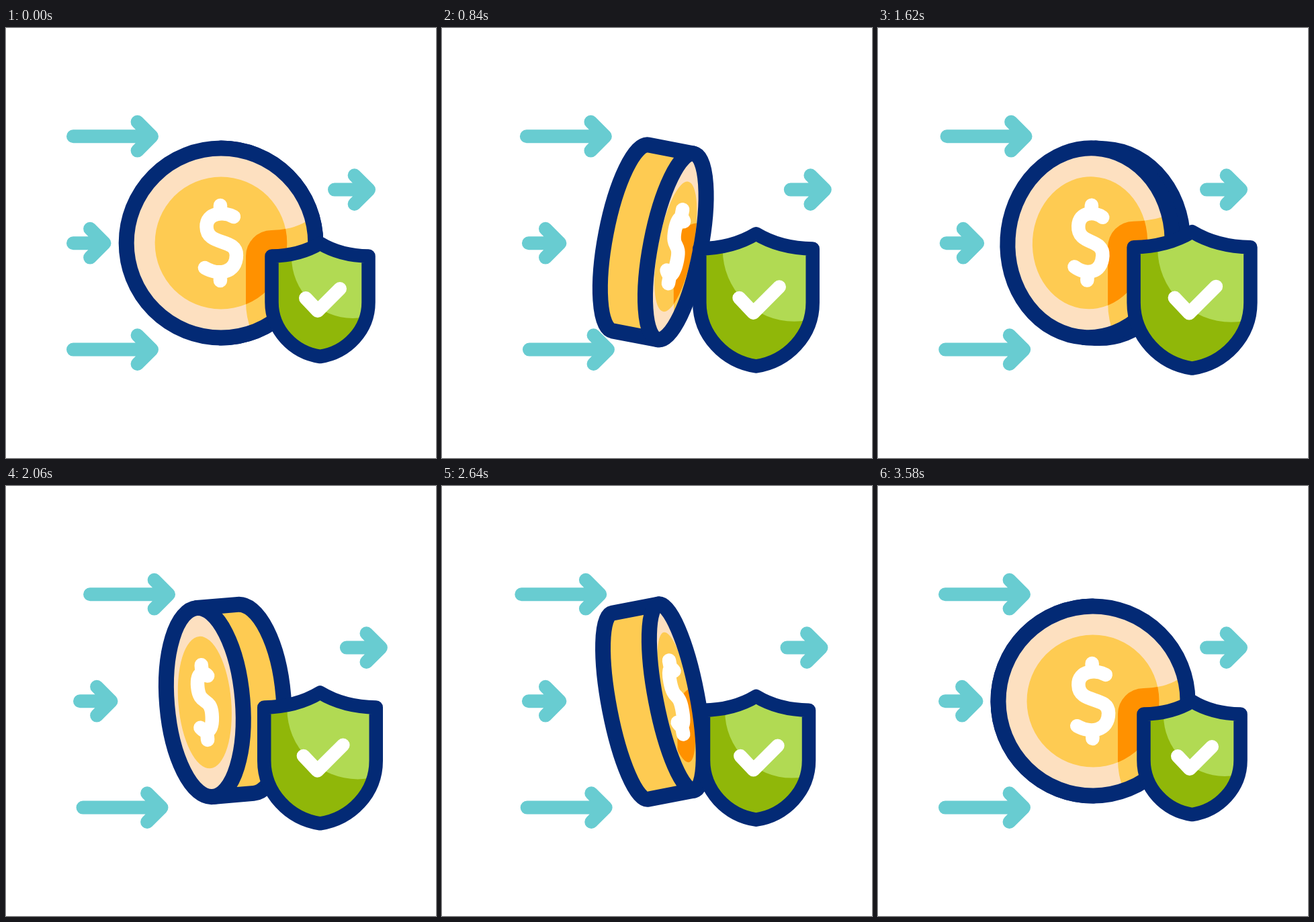
These frames come from a looping animation (640x640 px, 3600 ms). An HTML page with a canvas:

```html
<!DOCTYPE html>
<html lang="en">
<head>
<meta charset="utf-8">
<title>Protected payment</title>
<style>
  html, body { margin: 0; width: 100%; height: 100%; overflow: hidden; background: #fff; }
  canvas { display: block; width: 640px; height: 640px; }
</style>
</head>
<body>
<canvas id="stage" width="640" height="640"></canvas>
<script>
const ctx = document.getElementById('stage').getContext('2d');
const LOOP = 3600;
const NAVY = '#032a75', GOLD = '#fecb52', PEACH = '#fde0c0', ORANGE = '#ff9100';
const TEAL = '#68ccd1', GREEN = '#90b709', LIME = '#b1da53', WHITE = '#fff';
const R = 141, RIM = 23;

// Tail x, line length, y, then times of: start, out, back, out, back
const ARROWS = [
  { x: 100, y: 161.2, len: 117, keys: [0, 640, 1469, 2276, 3240] },
  { x: 489, y: 240.6, len: 51, keys: [0, 800, 1608, 2415, 3380] },
  { x: 100, y: 478.6, len: 117, keys: [50, 860, 1664, 2475, 3440] },
  { x: 100, y: 320.2, len: 46.5, keys: [130, 940, 1743, 2554, 3519] }
];
const COIN_KEYS = [0, 630, 1490, 2405, 3570];

// Shapes are relative to the centre of their group
const SHIELD = new Path2D('M-72-64.5Q-30.5-65 0-83.5Q30.5-65 72-64.5V4C72 46 39.5 79 0 85C-39.5 79-72 46-72 4Z');
const GLOSS = new Path2D();
GLOSS.arc(48.5, -63, 91, 0, 2 * Math.PI);
const CHECK = new Path2D('M-21.5-2L-3.5 17L29.5-16');
const DOLLAR = new Path2D('M19-39C5-47-22-46-21.5-24C-21 5 23-8 23 18C23 46-5 48-24 37M-1-56V-44M-1 44V56');

ctx.lineCap = ctx.lineJoin = 'round';

const wave = u => (1 - Math.cos(Math.PI * u)) / 2;

function stroke(path, color, width) {
  ctx.strokeStyle = color;
  ctx.lineWidth = width;
  ctx.stroke(path);
}

function fill(path, color) {
  ctx.fillStyle = color;
  ctx.fill(path);
}

function clipTo(path, draw) {
  ctx.save();
  ctx.clip(path);
  draw();
  ctx.restore();
}

// Transforming the path, not the context, keeps line widths constant
function place(path, matrix) {
  const out = new Path2D();
  out.addPath(path, matrix);
  return out;
}

// Segment index and progress within a list of key times
function segment(keys, t) {
  if (t <= keys[0]) return [0, 0];
  for (let i = 1; i < keys.length; i++) {
    if (t < keys[i]) return [i - 1, (t - keys[i - 1]) / (keys[i] - keys[i - 1])];
  }
  return [keys.length - 2, 1];
}

function drawArrow({ x, y, len, keys }, t) {
  const [i, u] = segment(keys, t);
  const out = i % 2 ? 1 - wave(i === 3 ? u ** 0.87 : u) : wave(u);
  const tail = x + 30 * out, tip = tail + len;
  const p = new Path2D();
  p.moveTo(tail, y);
  p.lineTo(tip, y);
  p.moveTo(tip - 21.4, y - 21.4);
  p.lineTo(tip, y);
  p.lineTo(tip - 21.4, y + 21.4);
  stroke(p, TEAL, 20);
}

function drawCoin(t, shield) {
  const [i, u] = segment(COIN_KEYS, t);
  const open = i % 2 ? u : 1 - u;
  const m = Math.max(0.001, open * (1.1 - 0.1 * open));
  const side = i % 2 ? 1 : -1;
  const depth = 74 * (1 - m * m) ** 1.1;
  const front = side * depth * (0.25 + 0.0024 * depth);
  const back = front - side * depth;

  const axis = new DOMMatrix().translate(320, 320).rotate(11 * Math.sin(2 * Math.PI * t / LOOP));
  const face = axis.translate(front, 0).scale(m, 1);
  const disc = r => {
    const p = new Path2D();
    p.arc(0, 0, r, 0, 2 * Math.PI);
    return place(p, face);
  };

  const wall = new Path2D();
  wall.moveTo(front, -R);
  wall.lineTo(back, -R);
  wall.ellipse(back, 0, R * m, R, 0, -Math.PI / 2, Math.PI / 2, side > 0);
  wall.lineTo(front, R);
  wall.closePath();
  const body = place(wall, axis);
  fill(body, GOLD);
  stroke(body, NAVY, RIM);

  const outer = disc(R), inner = disc(98.5);
  fill(outer, PEACH);
  clipTo(outer, () => {
    stroke(shield, GOLD, 77);
    fill(inner, GOLD);
    clipTo(inner, () => stroke(shield, ORANGE, 77));
  });
  stroke(outer, NAVY, RIM);
  stroke(place(DOLLAR, face), WHITE, 20.5);
}

function drawShield(shield, matrix) {
  fill(shield, GREEN);
  clipTo(shield, () => fill(place(GLOSS, matrix), LIME));
  stroke(shield, NAVY, 20.5);
  stroke(place(CHECK, matrix), WHITE, 20);
}

function draw(t) {
  fill(new Path2D('M0 0H640V640H0Z'), WHITE);
  const s = 1 + 0.26 * wave(t / 600);
  const matrix = new DOMMatrix().translate(467.5, 404).scale(s);
  const shield = place(SHIELD, matrix);
  ARROWS.forEach(a => drawArrow(a, t));
  drawCoin(t, shield);
  drawShield(shield, matrix);
}

const start = performance.now();
function frame(now) {
  draw(Math.max(0, now - start) % LOOP);
  requestAnimationFrame(frame);
}
draw(0);
requestAnimationFrame(frame);
</script>
</body>
</html>
```
